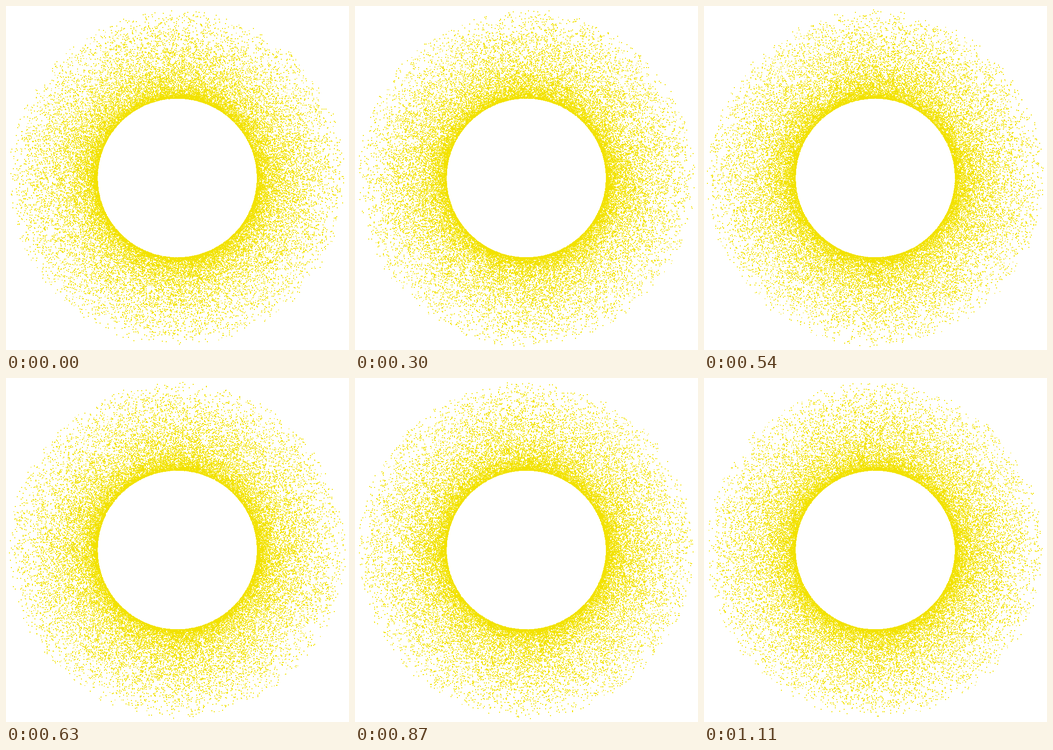
Recreate the animation shown at these times as an HTML page with a canvas. Size 700x704 px, loop 1140 ms.

```html
<!DOCTYPE html>
<html lang="en">
<head>
<meta charset="utf-8">
<title>Particle corona</title>
<style>
  html, body { margin: 0; width: 100%; height: 100%; overflow: hidden; background: #fff; }
  canvas { display: block; }
</style>
</head>
<body>
<canvas id="stage" width="700" height="704"></canvas>
<script>
const W = 700, H = 704, CX = 349.6, CY = 352;
const INNER = 163.2, REACH = 182, COUNT = 34000;
const LOOP = 1140, STEP = 30, TAU = Math.PI * 2;
const WHITE = 0xffffffff, YELLOW = 0xff00e2f2; // ABGR

const ctx = document.getElementById('stage').getContext('2d');
const image = ctx.createImageData(W, H);
const pixels = new Uint32Array(image.data.buffer);

function seeded(seed) {
  return () => {
    seed = (seed + 0x6d2b79f5) | 0;
    let n = Math.imul(seed ^ (seed >>> 15), 1 | seed);
    n = (n + Math.imul(n ^ (n >>> 7), 61 | n)) ^ n;
    return ((n ^ (n >>> 14)) >>> 0) / 4294967296;
  };
}

const rand = seeded(2718);
const dots = Array.from({ length: COUNT }, () => {
  const angle = rand() * TAU;
  // dots on the diagonals are a little thinner
  const thin = rand() < 0.3 * Math.sin(2 * angle) ** 2;
  const wide = rand() < 0.5;
  return {
    dx: Math.cos(angle),
    dy: Math.sin(angle),
    reach: REACH * rand() ** 0.9,
    phase: rand() * TAU,
    w: thin && !wide ? 1 : 2,
    h: thin && wide ? 1 : 2
  };
});

function draw(step) {
  const turn = step * STEP / LOOP * TAU;
  pixels.fill(WHITE);
  for (const d of dots) {
    const r = INNER + d.reach * (1 + Math.sin(turn + d.phase)) / 2;
    const x = Math.round(CX + d.dx * r) - 1;
    const y = Math.round(CY + d.dy * r) - 1;
    for (let j = 0; j < d.h; j++) {
      const at = (y + j) * W + x;
      pixels.fill(YELLOW, at, at + d.w);
    }
  }
  ctx.putImageData(image, 0, 0);
}

const start = performance.now();
let shown = 0;
draw(0);

function tick() {
  const step = Math.floor(((performance.now() - start) % LOOP) / STEP);
  if (step !== shown) draw(shown = step);
  requestAnimationFrame(tick);
}
requestAnimationFrame(tick);
</script>
</body>
</html>
```
